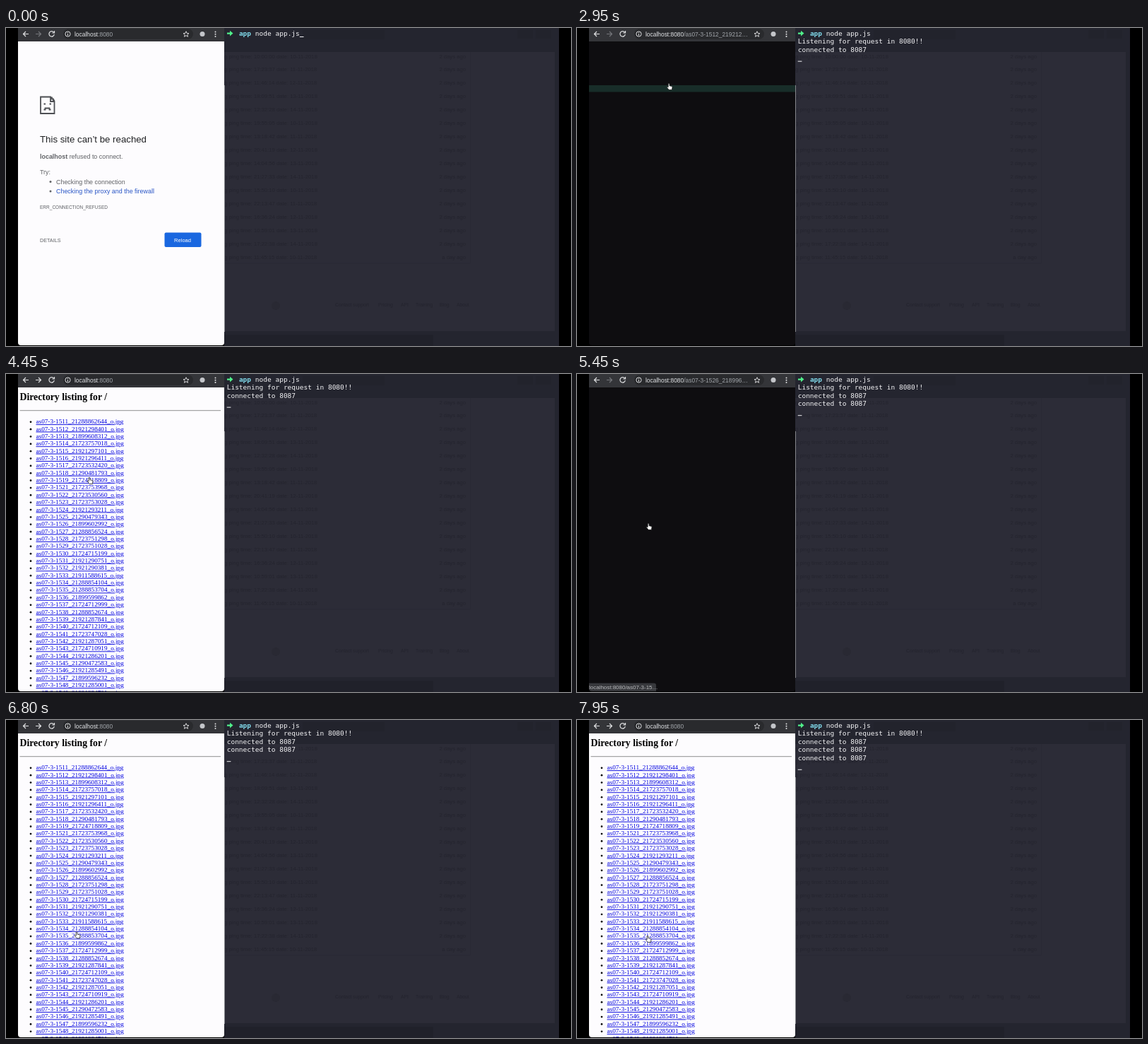
Write an HTML page that moves like this. It is 800 px wide and 450 px high and loops after 8000 ms.

```html
<!DOCTYPE html>
<html lang="en">
<head>
<meta charset="utf-8">
<title>Local file server</title>
<style>
html, body { margin: 0; width: 100%; height: 100%; overflow: hidden; background: #000; }
svg { display: block; width: 800px; height: 450px; }
text { white-space: pre; }
.sans { font-family: "Liberation Sans", Arial, sans-serif; }
.serif { font-family: "Liberation Serif", Times, serif; }
.mono { font: 9.52px "DejaVu Sans Mono", monospace; fill: #f4f4f6; }
</style>
</head>
<body>
<svg viewBox="0 0 800 450" xmlns="http://www.w3.org/2000/svg">
  <defs>
    <clipPath id="pageClip"><path d="M17 19H309V445Q309 449 305 449H21Q17 449 17 445Z"/></clipPath>
    <clipPath id="frameClip"><rect x="25" y="93.5" width="280.5" height="282" rx="8"/></clipPath>
    <clipPath id="loadClip"><rect id="loaded" x="17" y="81" width="292" height="0"/></clipPath>
    <filter id="ragged" x="-10%" y="-10%" width="120%" height="120%" color-interpolation-filters="sRGB">
      <feTurbulence type="fractalNoise" baseFrequency=".07" numOctaves="3" seed="4"/>
      <feDisplacementMap in="SourceGraphic" scale="18" xChannelSelector="R" yChannelSelector="G"/>
      <feGaussianBlur stdDeviation=".9"/>
    </filter>
    <filter id="soft" x="-10%" y="-10%" width="120%" height="120%"><feGaussianBlur stdDeviation="2"/></filter>
    <linearGradient id="sea" x1="0" y1="0" x2="0" y2="1">
      <stop offset="0" stop-color="#74bcc5"/><stop offset=".18" stop-color="#58a7bf"/>
      <stop offset=".6" stop-color="#4b98bb"/><stop offset="1" stop-color="#529bb5"/>
    </linearGradient>
    <linearGradient id="hull" x1=".2" y1="0" x2=".35" y2="1">
      <stop offset="0" stop-color="#456f79"/><stop offset=".45" stop-color="#36565f"/><stop offset="1" stop-color="#142a30"/>
    </linearGradient>
    <linearGradient id="panel" x1="0" y1="0" x2="1" y2="1">
      <stop offset="0" stop-color="#3d3f35"/><stop offset="1" stop-color="#514f3f"/>
    </linearGradient>
    <g id="craft">
      <path d="M188 183L199 182.500 200 202 205 206 212 205 213 212 204 216 200 219 201 235 188 236 189 219 184 215 168 214V206L185 204 188 201Z" fill="#756e5f"/>
      <path d="M194 184V234M169 210H212" stroke="#4c4a45" stroke-width=".8"/>
      <circle cx="194" cy="210.500" r="9.500" fill="#2b2e2f"/>
      <circle cx="193" cy="210.500" r="5" fill="#606866"/>
      <circle cx="189.500" cy="210" r="2.200" fill="#e4e9df"/>
    </g>
    <g id="clouds" fill="#bcdfdc" filter="url(#ragged)">
      <path d="M72 101Q190 92 305 103V109Q230 98 150 104T72 107Z" opacity=".6"/>
      <path d="M228 119Q262 111 310 121V154Q287 148 276 137T228 119Z" opacity=".5"/>
      <path d="M71 121Q95 130 134 123L120 129Q95 132 71 128Z" opacity=".6"/>
      <path d="M216 177Q250 176 284 185L270 188Q244 183 216 181Z" opacity=".8"/>
      <path d="M102 276Q121 264 146 267L133 274 108 281Z" opacity=".8"/>
      <path d="M124 238L132 246 129 252Z" opacity=".7"/>
      <path d="M209 281Q222 288 228 301T256 317L246 322Q222 315 213 301Z" opacity=".85"/>
      <path d="M243 280Q262 279 280 292L268 293Z" opacity=".6"/>
      <path d="M79 283L98 292 108 290 125 304 137 302 150 318 174 320 189 333 214 333 227 344 251 337 267 344 281 332 310 342V384H174Z" opacity=".85"/>
      <path d="M269 329L289 310 310 305V323L286 334Z" opacity=".65"/>
    </g>
  </defs>

  <rect width="800" height="450"/>
  <rect x="309" width="474" height="450" fill="#24252f"/>
  <path d="M309 34H777V429H309Z" fill="#2c2c37"/>
  <path d="M309 434H605V450H309Z" fill="#20212a"/>
  <path d="M724 3H746V15H724ZM750 3H772V15H750ZM420 3H536V16H420Z" fill="#22232c"/>
  <path d="M657.500 34V333H309" fill="none" stroke="#292934"/>
  <g id="ghost" class="sans" font-size="7.700" fill="#24242e"></g>
  <circle cx="382" cy="393" r="6" fill="#292933"/>
  <g id="terminal"></g>

  <rect x="17" width="292" height="20" fill="#343539"/>
  <rect x="81" y="1" width="184" height="15" rx="7.500" fill="#292a2d"/>
  <g fill="none" stroke="#e2e3e5" stroke-width="1.200">
    <path d="M32 8.500H24.500M28 5L24.500 8.500 28 12"/>
    <path id="forward" d="M42 8.500H49.500M46 5L49.500 8.500 46 12"/>
    <path id="reload" d="M67.500 6A3.700 3.700 0 1 0 68.300 9M68.500 4V7H65.500"/>
    <path id="stop" d="M61.500 5.500L67.500 11.500M67.500 5.500L61.500 11.500"/>
    <circle cx="87.500" cy="8.500" r="3.600" stroke-width="1"/>
    <path d="M87.500 8V10.800M87.500 6.200V7.100" stroke-width="1"/>
    <path d="M255 4.700L256.100 7.400 259 7.600 256.800 9.500 257.500 12.300 255 10.700 252.500 12.300 253.200 9.500 251 7.600 253.900 7.400Z" stroke-width=".9"/>
  </g>
  <circle cx="278" cy="8.500" r="3.500" fill="#c4c6ca"/>
  <g fill="#e2e3e5"><circle cx="296.500" cy="5.500" r="1"/><circle cx="296.500" cy="8.700" r="1"/><circle cx="296.500" cy="11.900" r="1"/></g>
  <rect id="selection" x="95" y="3" width="58" height="11" fill="#4d79ae"/>
  <text class="sans" x="97" y="11.600" font-size="8.420" fill="#e1e3e6"><tspan>localhost</tspan><tspan id="port">:8080</tspan><tspan id="path" fill="#a0a4a9"></tspan></text>

  <path d="M309.500 81V430" stroke="#85868b"/>
  <g clip-path="url(#pageClip)">
    <rect id="paper" x="17" y="19" width="292" height="431"/>

    <g id="error" class="sans" font-size="8.930" fill="#606266">
      <g fill="none" stroke="#4d4f53" stroke-width="1.800">
        <path d="M49 97.500H63V104H68.500V121H49Z"/>
        <path d="M63 98.500H65V100.500H67V102.500H69"/>
        <path d="M53.500 107.500H56M61.500 107.500H64M53.500 115.500H55.500V113.500H61.500V115.500H63.500"/>
      </g>
      <text x="48" y="161.500" font-size="13.250" fill="#202124">This site can’t be reached</text>
      <text x="48" y="184.500"><tspan font-weight="bold">localhost</tspan> refused to connect.</text>
      <text x="48" y="206.500">Try:</text>
      <circle cx="63" cy="217.500" r="1.500"/><circle cx="63" cy="231" r="1.500"/>
      <text x="71" y="220.500">Checking the connection</text>
      <text x="71" y="234.300" fill="#2a56c6">Checking the proxy and the firewall</text>
      <text x="48" y="255.500" font-size="6.520">ERR_CONNECTION_REFUSED</text>
      <text x="48" y="302.600" font-size="7.200">DETAILS</text>
      <rect x="224.500" y="289.500" width="52" height="20.500" rx="2" fill="#1967e0"/>
      <text x="238" y="302.700" font-size="7.600" fill="#fff">Reload</text>
    </g>

    <g id="list" class="serif" font-size="9.200">
      <text x="19.500" y="37" font-size="13.750" font-weight="bold">Directory listing for /</text>
      <path d="M19.500 51.700H304" stroke="#909090"/>
    </g>

    <g id="photo">
      <g clip-path="url(#loadClip)">
        <rect x="17" y="81" width="292" height="307" fill="#182d29"/>
        <g clip-path="url(#frameClip)">
          <g class="scene">
            <rect x="25" y="93" width="281" height="283" fill="url(#sea)"/>
            <use href="#clouds"/><use href="#craft"/>
          </g>
          <g class="scene">
            <rect x="25" y="93" width="281" height="283" fill="url(#sea)"/>
            <path d="M68 93H305V97Q185 91 68 99Z" fill="#2b5a63"/>
            <use href="#clouds"/><use href="#craft"/>
            <g filter="url(#soft)">
              <path d="M15 83H68L78 281Q79 289 84 294L168 376 176 386H15Z" fill="url(#hull)"/>
              <path d="M15 255Q38 238 46 247L34 284 63 338 116 386H15Z" fill="#10242b" opacity=".55"/>
            </g>
          </g>
          <g class="scene">
            <rect x="25" y="93" width="281" height="283" fill="#4f707a"/>
            <g filter="url(#ragged)">
              <path d="M15 180Q60 175 82 206L105 290 15 340Z" fill="#647f84"/>
              <path d="M138 85H270L315 150V185L218 239Z" fill="#486c79"/>
              <path d="M185 85H246L315 160V190Q260 170 232 139T185 95Z" fill="#7b969a"/>
            </g>
            <path d="M25 93H53Q36 125 25 165ZM273 93H306V146Q297 111 273 93Z" fill="#13231f"/>
            <path d="M52 94H136L202 235 108 285Z" fill="url(#panel)"/>
            <path d="M95 94L147 250M80 181L171 154M90 211L186 197" stroke="#2c2d27" fill="none"/>
            <path d="M104 175L151 163 181 222 133 250Z" fill="#34342b" opacity=".5"/>
            <path d="M96 111L101 107 106 113 101 118Z" fill="#8d948a"/>
            <path d="M217 240L306 187V260L252 286Z" fill="#413f34"/>
            <path d="M261 259L287 247 294 264 267 281Z" fill="#26271f"/>
            <path d="M25 334L106 300 120 376H25Z" fill="#484739"/>
            <path d="M268 340L306 360V376H252Z" fill="#4c4e43"/>
            <circle cx="186" cy="325" r="84" fill="#76857f"/>
            <circle cx="186" cy="327" r="81" fill="#171b1a"/>
            <path d="M108 285Q150 235 222 245L255 285" fill="none" stroke="#363933" stroke-width="3"/>
            <path d="M128 276L118 357M190 267L225 290M246 296L260 340" stroke="#404640" stroke-width="2.500"/>
            <ellipse cx="180" cy="366" rx="36" ry="31" fill="#56615c"/>
            <path d="M168 337Q192 337 208 376H188Q190 350 168 337Z" fill="#b3bfb4"/>
            <path d="M114 365L251 286M188 320L222 376M176 300L190 322" stroke="#77796f" stroke-width="3.500"/>
            <path d="M114 365L251 286M188 320L222 376" stroke="#cbcdbc" stroke-width="1"/>
            <circle cx="172.500" cy="291" r="16" fill="#9cc4b0"/>
            <circle cx="172.500" cy="291" r="11" fill="none" stroke="#6f9987"/>
            <path d="M165 272L176 289 186 284M176 289L174 304" fill="none" stroke="#424e47" stroke-width="2"/>
          </g>
        </g>
      </g>
    </g>

    <g id="status">
      <path d="M17 437.500H109Q112 437.500 112 440.500V450H17Z" fill="#37383c"/>
      <text class="sans" x="17" y="446" font-size="7.970" fill="#b9babd">localhost:8080/as07-3-15…</text>
    </g>
  </g>

  <g id="pointer" stroke-linejoin="round">
    <path id="arrow" d="M-2-5V6L.6 3.700 2.300 7.500 4 6.700 2.400 3.100H6Z" fill="#111" stroke="#fff" stroke-width=".8"/>
    <path id="beam" d="M-2-4.500Q0-4.500 0-3Q0-4.500 2-4.500M0-3V3.500M-2 5Q0 5 0 3.500Q0 5 2 5M-1 .8H1" fill="none" stroke="#e8e8e8" stroke-width="1"/>
    <path id="hand" d="M-1.800-4.300Q-.8-5 0-4V-1.200L3-.6Q4.200-.2 4 1L3.300 4.500H-.8L-3.700.9Q-3.500-.3-2.300.4L-1.800.8Z" fill="#fff" stroke="#222" stroke-width=".8"/>
  </g>
</svg>

<script>
const LOOP = 8000;
const $ = id => document.getElementById(id);
const show = (el, on) => el.setAttribute('visibility', on ? 'inherit' : 'hidden');

function add(parent, tag, attrs, content = '') {
  const el = document.createElementNS('http://www.w3.org/2000/svg', tag);
  for (const key in attrs) el.setAttribute(key, attrs[key]);
  el.textContent = content;
  parent.append(el);
  return el;
}

// Directory listing: consecutive numbers, with 1520 missing
const fileIds = `21288862644 21921298401 21899608312 21723757018 21921297101 21921296411
21723532420 21290481793 21724718809 21723753968 21723530560 21723753028 21921293211
21290479343 21899602992 21288856524 21723751298 21723751028 21724715199 21921290751
21921290381 21911588615 21288854104 21288853704 21899599862 21724712999 21288852674
21921287841 21724712109 21723747028 21921287051 21724710919 21921286201 21290472583
21921285491 21899596232 21921285001 21921284701`.split(/\s+/);
fileIds.forEach((id, i) => {
  const y = 70.2 + i * 10.36;
  add($('list'), 'circle', { cx: 35, cy: y - 2.4, r: 1.35 });
  add($('list'), 'text', { x: 42.5, y, fill: '#0000e0', 'text-decoration': 'underline' },
    `as07-3-${1511 + i + (i > 8)}_${id}_o.jpg`);
});

// Dim page behind the terminal
const two = n => String(n).padStart(2, '0');
for (let i = 0; i < 16; i++) {
  const y = 42.5 + i * 18.95;
  const time = [10 + i * 7 % 13, i * 23 % 60, i * 37 % 60].map(two).join(':');
  add($('ghost'), 'text', { x: 309, y }, `g ping time: ${time} date: ${two(10 + i % 5)}-11-2018`);
  add($('ghost'), 'text', { x: 651, y, 'text-anchor': 'end' }, i < 15 ? '2 days ago' : 'a day ago');
}
[[466, 'Contact support'], [527, 'Pricing'], [559, 'API'], [580, 'Training'], [614, 'Blog'], [638, 'About']]
  .forEach(([x, label]) => add($('ghost'), 'text', { x, y: 394, 'font-size': 6.8 }, label));

// Terminal
const CHAR = 5.73, LINE = 11.55, LEFT = 312.7, TOP = 10.6;
const term = $('terminal');
add(term, 'path', { d: 'M313 6.500H317V3.700L321.500 7.600 317 11.400V8.700H313Z', fill: '#50f08a' });
add(term, 'text', { class: 'mono', x: LEFT + 3 * CHAR, y: TOP, style: 'fill:#83dff0;font-weight:bold' }, 'app');
add(term, 'text', { class: 'mono', x: LEFT + 7 * CHAR, y: TOP }, 'node app.js');
const output = [
  [350, 'Listening for request in 8080!!'],
  [1450, 'connected to 8087'],
  [5350, 'connected to 8087'],
  [6950, 'connected to 8087']
].map(([at, line], i) => ({
  at, el: add(term, 'text', { class: 'mono', x: LEFT, y: TOP + (i + 1) * LINE }, line)
}));
const caret = add(term, 'rect', { width: 5.7, height: 1, fill: '#f4f4f6' });

// Browser pages: start time, kind, and for photos the scene, path and load window
const pages = [
  { at: 0, kind: 'error' },
  { at: 1750, kind: 'list' },
  { at: 2620, kind: 'photo', scene: 0, path: '/as07-3-1512_219212…', load: [2932, 3550] },
  { at: 4220, kind: 'list' },
  { at: 5300, kind: 'photo', scene: 1, path: '/as07-3-1526_218996…', load: [5500, 6000] },
  { at: 6500, kind: 'list' },
  { at: 6950, kind: 'photo', scene: 2, path: '/as07-3-1535_212888…', load: [7050, 7350] },
  { at: 7720, kind: 'list' }
];
const scenes = document.querySelectorAll('.scene');

// Pointer stops: time, x, y
const stops = [
  [450, 240, 298], [850, 167, 8], [1900, 167, 8], [2400, 131, 83], [4250, 131, 83],
  [4450, 119, 151], [4850, 102, 216], [6520, 102, 216], [6850, 101, 310], [LOOP, 101, 310]
];
const clamp = v => Math.max(0, Math.min(1, v));
const within = (t, from, to) => t >= from && t < to;

function pointerAt(t) {
  const i = Math.max(1, stops.findIndex(s => s[0] > t));
  const [t0, x0, y0] = stops[i - 1], [t1, x1, y1] = stops[i];
  const k = clamp((t - t0) / (t1 - t0));
  const ease = k * k * (3 - 2 * k);
  return [x0 + (x1 - x0) * ease, y0 + (y1 - y0) * ease];
}

function draw(t) {
  const page = pages.findLast(p => t >= p.at);
  for (const kind of ['error', 'list', 'photo']) show($(kind), page.kind === kind);
  const isPhoto = page.kind === 'photo';
  $('paper').setAttribute('fill', isPhoto ? '#0e0d10' : '#fdfcfe');
  scenes.forEach((el, i) => show(el, page.scene === i));
  if (isPhoto) {
    const [from, to] = page.load;
    $('loaded').setAttribute('height', 307 * clamp((t - from) / (to - from)));
  }
  $('path').textContent = page.path || '';
  $('port').setAttribute('fill', isPhoto ? '#e1e3e6' : '#a0a4a9');
  $('forward').setAttribute('stroke', page.kind === 'list' && t > 4000 ? '#e2e3e5' : '#75767b');

  const loading = within(t, 1400, 1750) || isPhoto && t < page.load[0] - 50;
  show($('stop'), loading);
  show($('reload'), !loading);
  show($('selection'), within(t, 800, 1400));
  show($('status'), within(t, 2300, 2750) || within(t, 4850, 6450) || within(t, 6830, 7650));

  let row = 0;
  for (const line of output) {
    show(line.el, t >= line.at);
    if (t >= line.at) row++;
  }
  caret.setAttribute('x', row ? LEFT : LEFT + 18 * CHAR);
  caret.setAttribute('y', row ? 12 + (row + 1) * LINE : 12);

  const [x, y] = pointerAt(t);
  $('pointer').setAttribute('transform', `translate(${x} ${y})`);
  const overLinks = t > 2000 && y > 60;
  const inAddress = y < 18;
  show($('pointer'), t >= 450);
  show($('hand'), overLinks);
  show($('beam'), inAddress);
  show($('arrow'), !overLinks && !inAddress);
}

const start = performance.now();
function tick() {
  draw((performance.now() - start) % LOOP);
  requestAnimationFrame(tick);
}
tick();
</script>
</body>
</html>
```
